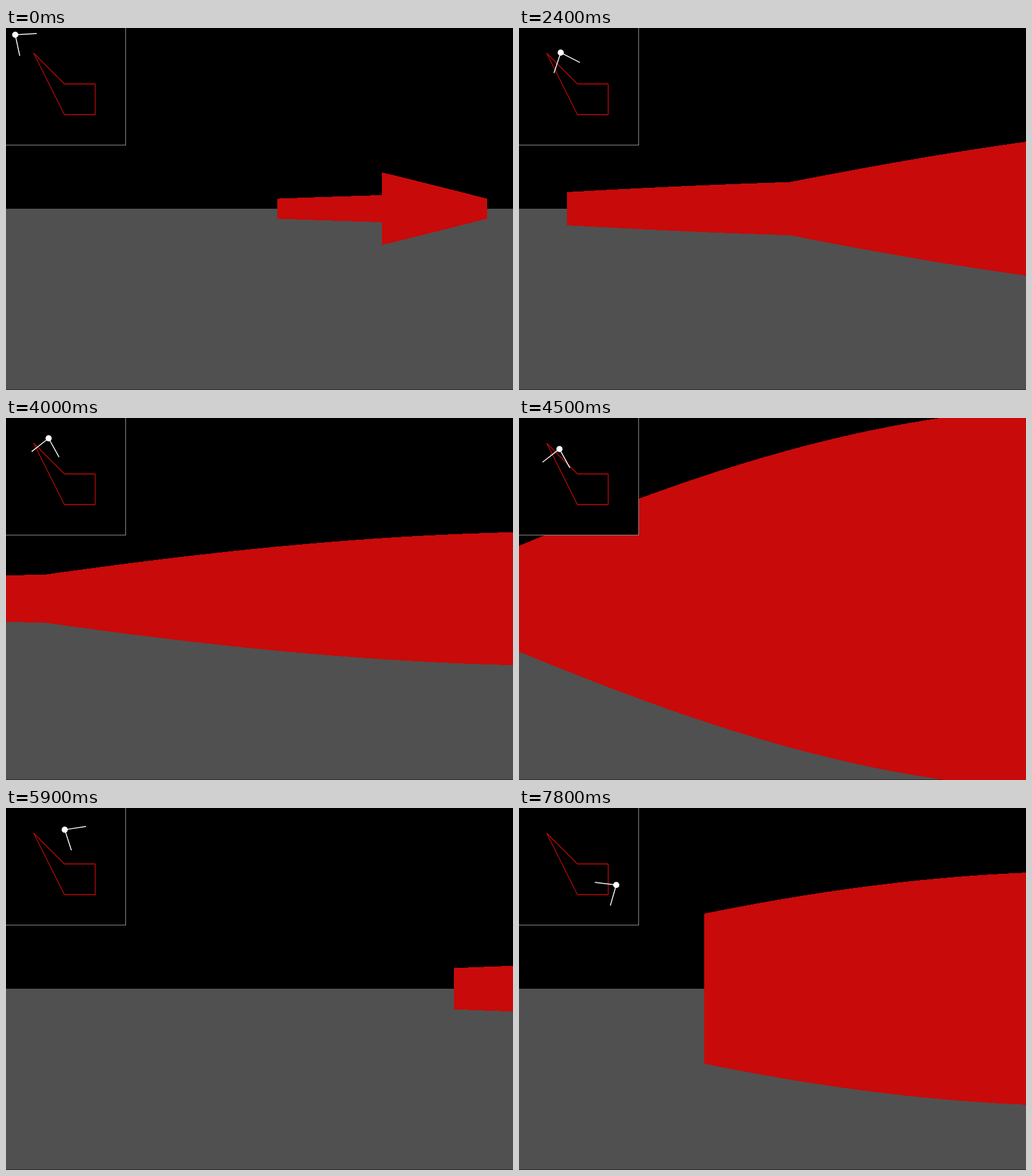
An HTML page with a canvas for the animation above (8 s loop, 824x589 px).

```html
<!DOCTYPE html>
<html>
<head>
<meta charset="utf-8">
<style>
html, body { margin: 0; width: 100%; height: 100%; overflow: hidden; background: #000; }
canvas { display: block; }
</style>
</head>
<body>
<canvas id="view" width="824" height="589"></canvas>
<script>
const ctx = document.getElementById('view').getContext('2d');
const W = 824, HORIZON = 294, LOOP = 8000, STEP = 100;
const RED = '#c80a0a';
const RAD = Math.PI / 180;
const DEG_PER_COLUMN = 0.07876, MAP_FOV = 81, WALL_SIZE = 5000;
const corners = [[45, 41], [95, 91], [145, 91], [145, 141], [95, 141]];
const walls = corners.map((p, i) => [p, corners[(i + 1) % corners.length]]);

// The viewer: a is the left edge of the field of view, walking goes along its middle.
const viewer = { t: 0, x: 15, y: 11, a: -3.12 };
const poses = [{ ...viewer }];

// Pause, then cover the distance and the angle in equal steps.
function walk(pause, distance, steps = 1, angle = 0) {
  viewer.t += pause - STEP;
  for (let i = 0; i < steps; i++) {
    const heading = (viewer.a + angle / steps / 2 + MAP_FOV / 2) * RAD;
    viewer.t += STEP;
    viewer.a += angle / steps;
    viewer.x += distance / steps * Math.cos(heading);
    viewer.y += distance / steps * Math.sin(heading);
    poses.push({ ...viewer });
  }
}
const turn = (pause, angle, steps) => walk(pause, 0, steps, angle);

// Look around, then walk up to the slanted wall.
turn(300, -2.75);
turn(200, 39.87, 4);
turn(300, -25.39, 2);
turn(100, -20.31, 2);
walk(200, 60.3, 5);
turn(100, 39, 4);
turn(300, 33.7);
// Step in and out twice.
walk(200, 3.3);
walk(200, 8.7);
walk(300, -11, 2);
walk(200, -3.4);
walk(300, -4.8);
walk(100, -4.2);
walk(200, 10);
walk(200, 12);
walk(200, -19, 2);
walk(200, -10.3);
// Turn away and curve around the corner.
turn(100, -13.2);
turn(200, -25.2);
turn(200, -30.6, 2);
walk(200, 14, 1, -5);
walk(100, 27, 2, 8);
walk(200, 29.4, 2, 8);
walk(200, 14.4, 1, 1);
walk(200, 12.81, 1, 30);
// Pass the right wall and turn to face it.
walk(200, 22, 2);
walk(200, 15.5);
walk(100, 6.8);
turn(200, 32);
turn(200, 40, 2);

function castRay(x, y, angle) {
  const dx = Math.cos(angle), dy = Math.sin(angle);
  let nearest = Infinity;
  for (const [[ax, ay], [bx, by]] of walls) {
    const ex = bx - ax, ey = by - ay, qx = ax - x, qy = ay - y;
    const det = dx * ey - dy * ex;
    const dist = (qx * ey - qy * ex) / det;
    const along = (qx * dy - qy * dx) / det;
    if (dist > 0 && along >= 0 && along <= 1) nearest = Math.min(nearest, dist);
  }
  return nearest;
}

function drawScene({ x, y, a }) {
  ctx.fillStyle = '#000';
  ctx.fillRect(0, 0, W, 589);
  ctx.fillStyle = '#505050';
  ctx.fillRect(0, HORIZON, W, 294.5);
  ctx.fillStyle = RED;
  for (let col = 0; col < W; col++) {
    const dist = castRay(x, y, (a + col * DEG_PER_COLUMN) * RAD);
    if (dist === Infinity) continue;
    const half = Math.round(WALL_SIZE / dist / 2);
    ctx.fillRect(col, HORIZON - half, 1, half * 2);
  }
}

function line(x1, y1, x2, y2) {
  ctx.beginPath();
  ctx.moveTo(x1, y1);
  ctx.lineTo(x2, y2);
  ctx.stroke();
}

function drawMap({ x, y, a }) {
  ctx.fillStyle = '#909090';
  ctx.fillRect(0, 0, 195, 191);
  ctx.fillStyle = '#000';
  ctx.fillRect(0, 0, 194, 190);
  ctx.strokeStyle = RED;
  ctx.lineWidth = 1.3;
  for (const [p, q] of walls) line(...p, ...q);
  ctx.strokeStyle = ctx.fillStyle = '#fff';
  ctx.lineWidth = 1.5;
  for (const side of [a, a + MAP_FOV]) {
    line(x, y, x + 35 * Math.cos(side * RAD), y + 35 * Math.sin(side * RAD));
  }
  ctx.beginPath();
  ctx.arc(x, y, 5, 0, 2 * Math.PI);
  ctx.fill();
}

function frame() {
  const t = performance.now() % LOOP;
  const pose = poses.filter(p => p.t <= t).pop();
  drawScene(pose);
  drawMap(pose);
  requestAnimationFrame(frame);
}
frame();
</script>
</body>
</html>
```
